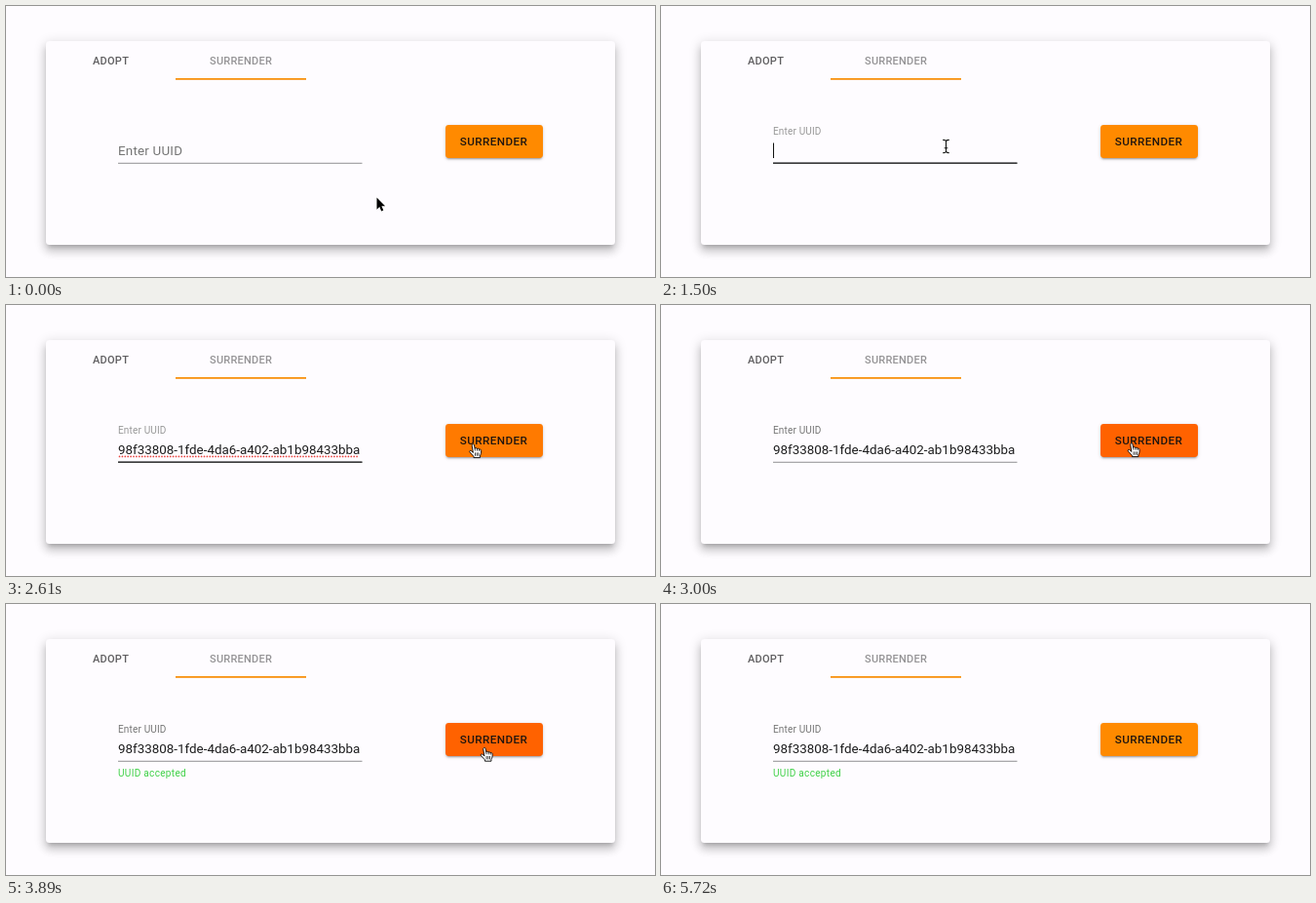
An HTML page that plays this animation: 666x278 px, repeating every 5770 ms.

```html
<!DOCTYPE html>
<html lang="en">
<head>
<meta charset="utf-8">
<title>Surrender form</title>
<style>
  html, body { margin: 0; width: 100%; height: 100%; overflow: hidden; background: #fefcff; }
  #stage { position: relative; width: 666px; height: 278px; overflow: hidden; background: #fefcff; }
  #card, #button { position: absolute; box-sizing: border-box; }
  #card {
    left: 41px; top: 36px; width: 584px; height: 209px; border-radius: 3.5px; background: #fefcff;
    box-shadow: 0 4px 4px -2.5px rgba(0,0,0,.2), 0 6.7px 8.4px .8px rgba(0,0,0,.14), 0 2.5px 11.7px 1.7px rgba(0,0,0,.12);
  }
  #button { left: 450.5px; top: 122px; width: 100px; height: 33.5px; border-radius: 3.4px; }
  svg { position: absolute; left: 0; top: 0; }
  text { font-family: Roboto, Arial, sans-serif; white-space: pre; }
  .tab { font-size: 11px; font-weight: 500; letter-spacing: .25px; }
</style>
</head>
<body>
<div id="stage">
  <div id="card"></div>
  <div id="button"></div>
  <svg width="666" height="278" viewBox="0 0 666 278">
    <text class="tab" x="89" y="59.5" fill="#5f5e60">ADOPT</text>
    <text class="tab" x="209" y="59.5" fill="#959496">SURRENDER</text>
    <rect x="174" y="74" width="134" height="1.8" fill="#f8920f"/>

    <text id="label" font-size="13.4" letter-spacing=".2">Enter UUID</text>
    <text id="value" x="115" y="153" font-size="13.4" fill="#1c1c1d">98f33808-1fde-4da6-a402-ab1b98433bba</text>
    <path id="spelling" d="M116.5 155.4H362" fill="none" stroke="#e8433f" stroke-width="1.7" stroke-linecap="round" stroke-dasharray="0 2.9"/>
    <rect id="caret" y="140.5" width="1" height="15.5" fill="#111"/>
    <rect x="115" y="160.8" width="250.5" height=".9" fill="#858486"/>
    <rect id="focusLine" y="160.5" height="1.3" fill="#1d1d1e"/>
    <text id="accepted" x="115" y="177" font-size="10.05" letter-spacing=".3" fill="#3fd147">UUID accepted</text>

    <text id="caption" x="465.8" y="143.2" font-size="11.7" font-weight="500" letter-spacing=".4" fill="#21160f">SURRENDER</text>
    <path id="spinner" fill="none" stroke="#979698" stroke-width="1.7"/>

    <g id="arrow">
      <path d="M0 0V12.2L2.8 9.6 4.7 14 6.8 13.1 4.9 8.8H8.6Z" fill="#000" stroke="#fff" stroke-width="1.6" stroke-linejoin="round" paint-order="stroke"/>
    </g>
    <g id="beam" fill="none" stroke-linecap="round">
      <path d="M-2.8 -6.6Q0 -6.6 0 -4.8Q0 -6.6 2.8 -6.6M0 -4.8V4.8M-2.8 6.6Q0 6.6 0 4.8Q0 6.6 2.8 6.6M-1.4 1.8H1.4" stroke="#fff" stroke-width="2.4"/>
      <path d="M-2.8 -6.6Q0 -6.6 0 -4.8Q0 -6.6 2.8 -6.6M0 -4.8V4.8M-2.8 6.6Q0 6.6 0 4.8Q0 6.6 2.8 6.6M-1.4 1.8H1.4" stroke="#111" stroke-width="1.1"/>
    </g>
    <g id="hand" stroke="#000" stroke-width=".9" stroke-linejoin="round" stroke-linecap="round">
      <path d="M-1.3 .8C-1.2 -.6 .8 -.6 1 .8L1.6 4.2C2.2 3.3 3.6 3.5 3.9 4.6C4.6 3.9 5.8 4.1 6.1 5.2C7 4.7 8.1 5.2 8.1 6.5C8.2 9 7.7 10.3 6.9 11.8V13.6H.4V12.3L-3.6 8C-4.5 6.8 -3 5.8 -2 6.7L-.4 8.2Z" fill="#fff"/>
      <path d="M1.6 4.2L1.9 6.2M3.9 4.6L4.1 6.4M6.1 5.2L6.2 6.6M2 8.8V11.4M3.8 8.8V11.4M5.5 8.8V11.4" fill="none" stroke-width=".75"/>
    </g>
  </svg>
</div>
<script>
const LOOP = 5770;
const FOCUS = 440, PASTE = 1760, HOVER = 2560, PRESS = 2900, SEND = 3040, ACCEPT = 3600, LEAVE = 3990, GONE = 5720;

// time, x, y of the pointer's hot spot
const PATH = [
  [0, 380.5, 196.5], [60, 380.5, 196.5], [250, 327, 162], [420, 292.5, 144], [2000, 292.5, 144],
  [2150, 330, 147], [2330, 430, 154], [2480, 497, 157], [2560, 486, 150], [2610, 479.5, 143],
  [3000, 483, 142], [3440, 484.5, 142], [3780, 490, 147], [3890, 491, 147.5], [4030, 500, 160],
  [4240, 520, 187], [4440, 530.5, 198.5], [5540, 530.5, 198.5], [5670, 575, 115], [LOOP, 575, 115]
];

const $ = id => document.getElementById(id);
const mix = (a, b, p) => a + (b - a) * p;
const span = (t, start, length) => Math.min(1, Math.max(0, (t - start) / length));
const ease = p => 1 - (1 - p) ** 3;
const show = (id, on) => $(id).style.display = on ? "" : "none";
const set = (id, attrs) => { for (const k in attrs) $(id).setAttribute(k, attrs[k]); };

function pointerAt(t) {
  const i = PATH.findIndex(k => k[0] > t);
  const a = PATH[i - 1], b = PATH[i];
  const p = span(t, a[0], b[0] - a[0]);
  return [mix(a[1], b[1], p), mix(a[2], b[2], p)];
}

function drawPointer(t) {
  const [x, y] = pointerAt(t);
  const inField = x > 115 && x < 366 && y > 121 && y < 178;
  const inButton = x > 450 && x < 551 && y > 122 && y < 156;
  const kind = inField ? "beam" : inButton ? "hand" : "arrow";
  for (const id of ["arrow", "beam", "hand"]) show(id, id === kind && t < GONE);
  set(kind, { transform: `translate(${x} ${y})` });
}

function drawField(t) {
  const focused = t >= FOCUS && t < PRESS;
  const pasted = t >= PASTE;
  const rise = ease(span(t, FOCUS, 400));
  const grey = focused ? mix(117, 152, rise) : 117;
  set("label", {
    transform: `translate(115 ${mix(153, 131.7, rise)}) scale(${mix(1, .75, rise)})`,
    fill: `rgb(${grey},${grey},${grey})`
  });
  show("value", pasted);
  show("spelling", pasted && focused);
  show("accepted", t >= ACCEPT);

  const blinkStart = pasted ? PASTE : FOCUS;
  show("caret", focused && Math.floor((t - blinkStart) / 500) % 2 === 0);
  set("caret", { x: pasted ? 363.3 : 115 });

  const width = 250.5 * mix(.5, 1, ease(span(t, FOCUS, 300)));
  show("focusLine", focused);
  set("focusLine", { x: 240.25 - width / 2, width });
}

function drawSpinner(t) {
  const grow = span(t, SEND, 500), shrink = span(t, SEND + 500, 500);
  const deg = a => a * Math.PI / 180;
  const start = deg(-90 + (t - 3440) * .18 + 270 * shrink);
  const end = start + deg(18 + 270 * (grow - shrink));
  const at = a => `${500.5 + 9.3 * Math.cos(a)} ${138.8 + 9.3 * Math.sin(a)}`;
  set("spinner", { d: `M${at(start)}A9.3 9.3 0 ${end - start > Math.PI ? 1 : 0} 1 ${at(end)}` });
}

function drawButton(t) {
  const busy = t >= SEND && t < ACCEPT;
  const hover = ease(span(t, HOVER, 330)) - ease(span(t, LEAVE, 330));
  const style = $("button").style;
  style.background = busy ? "#dad9db" : `rgb(255,${mix(138, 98, hover)},0)`;
  style.boxShadow = busy ? "none"
    : "0 2.5px 1px -1.7px rgba(0,0,0,.2), 0 1.7px 1.7px rgba(0,0,0,.14), 0 .8px 4.2px rgba(0,0,0,.12)";
  show("caption", !busy);
  show("spinner", busy);
  if (busy) drawSpinner(t);
}

function draw(now) {
  const t = now % LOOP;
  drawField(t);
  drawButton(t);
  drawPointer(t);
}

const begin = performance.now();
function tick() {
  draw(performance.now() - begin);
  requestAnimationFrame(tick);
}
draw(0);
requestAnimationFrame(tick);
</script>
</body>
</html>
```
